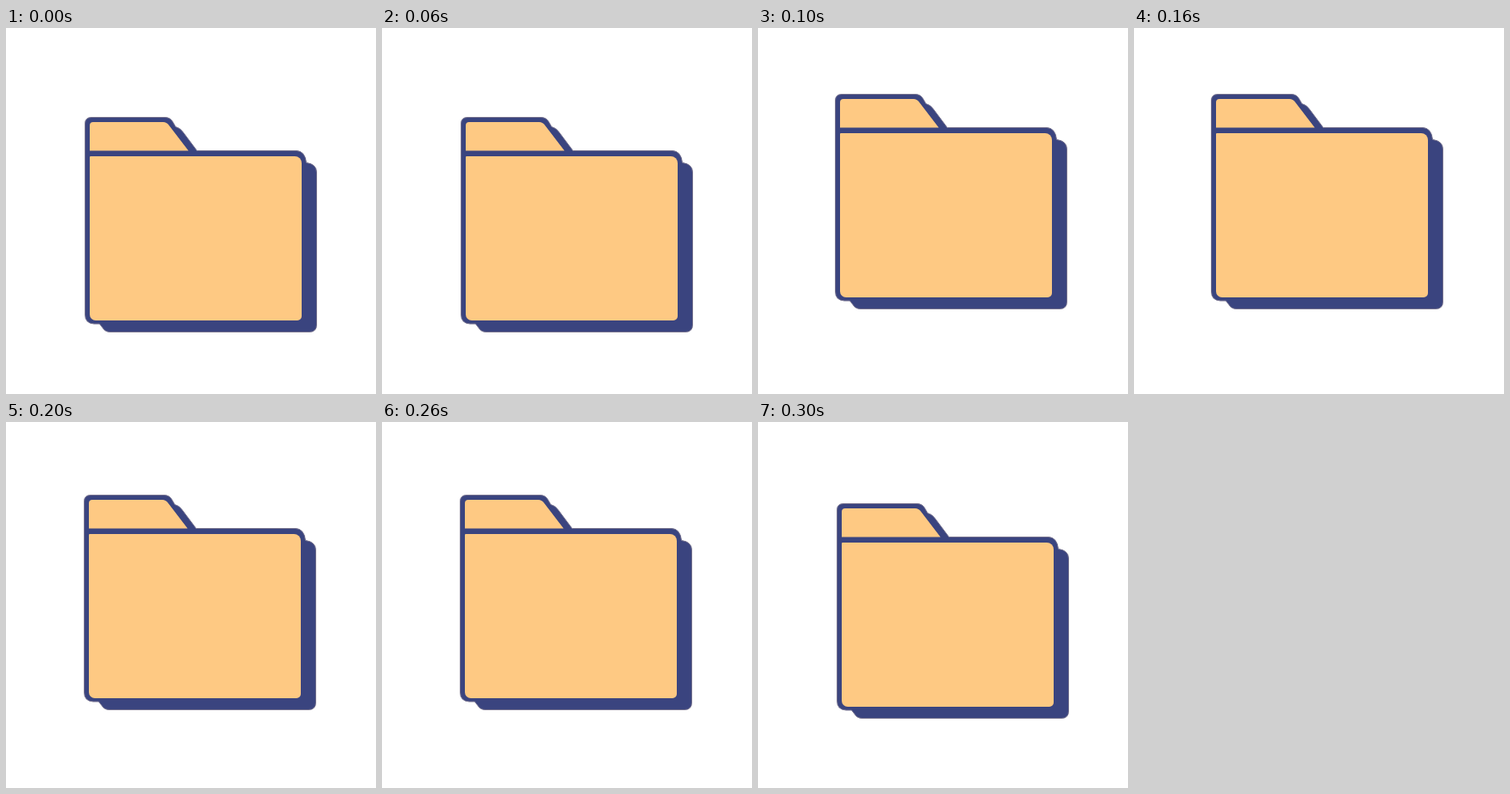
Write an HTML page with a canvas that moves like this. It is 433 px wide and 428 px high and loops after 400 ms.

```html
<!DOCTYPE html>
<html lang="en">
<head>
<meta charset="utf-8">
<title>Bouncing folder</title>
<style>
  html, body { margin: 0; width: 100%; height: 100%; overflow: hidden; background: #fff; }
  canvas { display: block; }
</style>
</head>
<body>
<canvas id="stage" width="433" height="428"></canvas>
<script>
const ctx = document.getElementById('stage').getContext('2d');
const NAVY = '#3a447f', EDGE = '#77738f', PEACH = '#fec983';
const STEP = 100;
const poses = [[0, 0], [-2, -27], [-1, -19], [0, -9]];

const outline = new Path2D(`M92.5 112 Q92.5 104.5 100 104.5 H186 Q192 104.5 195 109.5
  L198.500 115.5 Q204 117 207 121.500 L223.500 143.5 H340 Q350 144 351.500 157.5
  Q363.500 159 363.500 169 V347 Q363.500 355.5 355 355.5 H122 Q116 355.5 113 350.5
  L109.500 346 H103 Q92.5 345.500 92.5 335 Z`);

const tab = new Path2D('M98 143.5 V114 Q98 110 102 110 H184 Q188 110 190.500 113.5 L213.500 143.5 Z');

const front = new Path2D();
front.roundRect(98, 150, 248, 192, [1, 8, 5, 7]);

function draw(now) {
  const [x, y] = poses[Math.floor(now / STEP) % poses.length];
  ctx.fillStyle = '#fff';
  ctx.fillRect(0, 0, 433, 428);
  ctx.save();
  ctx.translate(x, y);
  ctx.fillStyle = NAVY;
  ctx.fill(outline);
  ctx.strokeStyle = EDGE;
  ctx.lineWidth = 1;
  ctx.stroke(outline);
  ctx.fillStyle = PEACH;
  ctx.fill(tab);
  ctx.fill(front);
  ctx.restore();
}

const start = performance.now();
function tick() {
  draw(performance.now() - start);
  requestAnimationFrame(tick);
}
tick();
</script>
</body>
</html>
```
